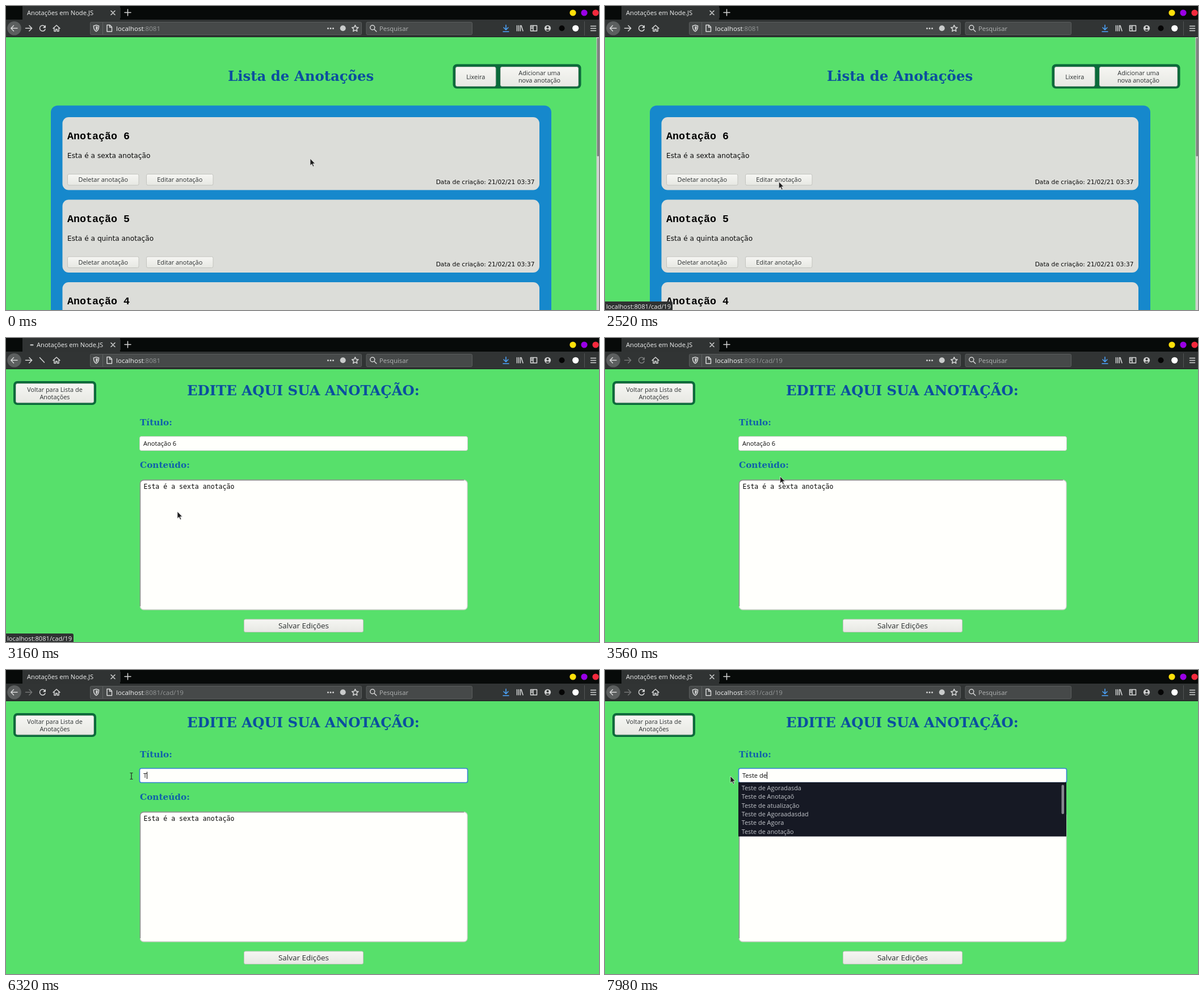
Write an HTML page that moves like this. It is 1045 px wide and 536 px high and loops after 8000 ms.

```html
<!DOCTYPE html>
<html lang="pt">
<head>
<meta charset="utf-8">
<title>Anotações</title>
<style>
html, body { margin: 0; width: 100%; height: 100%; overflow: hidden; background: #57e06b; }
svg { display: block; width: 1045px; height: 536px; }
text { white-space: pre; }
.ui { font-family: "Open Sans", "Noto Sans", sans-serif; }
.sans { font-family: "DejaVu Sans", sans-serif; }
.serif { font-family: "DejaVu Serif", serif; font-weight: bold; }
.code { font-family: "Liberation Mono", monospace; font-weight: bold; }
.mono { font-family: "DejaVu Sans Mono", monospace; }
.icon { fill: none; stroke: #d6d7d7; stroke-width: 1.5; stroke-linecap: round; stroke-linejoin: round; }
</style>
</head>
<body>
<svg id="stage" viewBox="0 0 1045 536" xmlns="http://www.w3.org/2000/svg"></svg>
<script>
const LOOP = 8000;
const stage = document.getElementById('stage');
const $ = id => document.getElementById(id);

const rect = (x, y, w, h, fill, r = 0, extra = '') =>
  `<rect x="${x}" y="${y}" width="${w}" height="${h}" rx="${r}" fill="${fill}" ${extra}/>`;
const text = (cls, size, x, y, str, fill, extra = '') =>
  `<text class="${cls}" font-size="${size}" x="${x}" y="${y}" fill="${fill}" ${extra}>${str}</text>`;
const dot = (x, y, r, fill) => `<circle cx="${x}" cy="${y}" r="${r}" fill="${fill}"/>`;
const icon = (d, extra = '') => `<path class="icon" d="${d}" ${extra}/>`;
const group = (id, body) => `<g id="${id}">${body}</g>`;

function button(x, y, w, h, lines, size = 10.95, id = '') {
  const cx = x + w / 2, gap = 13;
  const first = y + h / 2 + size * 0.37 - (lines.length - 1) * gap / 2;
  return rect(x + .5, y + .5, w - 1, h - 1, 'url(#btn)', 2.5, `stroke="#c3c4bf" ${id && `id="${id}"`}`) +
    lines.map((s, i) => text('ui', size, cx, first + i * gap, s, '#2c3031', 'text-anchor="middle"')).join('');
}

function card(y, n, word) {
  return rect(99.5, y, 840.5, 128.5, '#dcddd9', 11) +
    text('code', 18.35, 108, y + 39.3, `Anotação ${n}`, '#000') +
    text('sans', 12.2, 108, y + 72, `Esta é a ${word} anotação`, '#0a0a0a') +
    button(108, y + 100, 126.5, 20.5, ['Deletar anotação']) +
    button(247, y + 100, 118.5, 20.5, ['Editar anotação'], 10.95, 'edit' + n) +
    text('sans', 10.71, 931.5, y + 117.5, 'Data de criação: 21/02/21 03:37', '#0a0a0a', 'text-anchor="end"');
}

const chrome =
  rect(0, 0, 1045, 24, '#070a09') + rect(29, 0, 172, 24, '#303333') +
  rect(0, 24, 1045, 31, '#313434') + rect(0, 54, 1045, 1, '#1d2020') +
  rect(201, 3, 1, 18, '#2b2e2e') +
  text('ui', 11.15, 37, 15.7, 'Anotações em Node.JS', '#eff0f0', 'id="tab"') +
  `<rect id="spinner" y="11" height="2.4" rx="1.2" fill="#b9bbbb"/>` +
  icon('M185 8.5l7 7M192 8.5l-7 7') + icon('M209 11.5h11M214.500 6v11') +
  dot(999, 12, 5.6, '#ffe00a') + dot(1019, 12, 5.6, '#9a00e6') + dot(1039, 12, 5.6, '#f3293d') +
  dot(14.5, 39.3, 12.3, '#5c5f5f') +
  icon('M20 39.300H9M13.500 34.500L8.800 39.300l4.700 4.800') +
  icon('M34.500 39.300h11M41 34.500l4.700 4.800-4.700 4.800', 'id="forward"') +
  group('reload', icon('M68.500 36.300a5 5 0 1 0 .6 4.800') + '<path d="M70 33.500v5.200h-5.200z" fill="#d6d7d7"/>') +
  icon('M59.500 34.500l8 8.500', 'id="stopA"') + icon('M67.500 34.500l-8 8.500', 'id="stopB"') +
  icon('M83 39.500l6-5.500 6 5.500M85 39v5.500h2.700v-3.500h2.600v3.500H93V39') +
  rect(148.5, 28.5, 478, 22, '#464949', 2, 'stroke="#5b5e5e"') +
  rect(635, 28.5, 186.5, 22, '#464949', 2, 'stroke="#5b5e5e"') +
  icon('M159 33.700c2 1 3 1.200 4.600 1.300 0 5-1.200 8-4.600 9.800-3.400-1.800-4.600-4.800-4.600-9.800 1.600-.1 2.600-.3 4.600-1.300zM159 36.500v5.500c1.500-1 2-3 2-5z', 'stroke-width="1.2"') +
  rect(170, 29, 1, 21, '#5f6262') +
  icon('M178 33.500h5l3.500 3.500v8H178zM182.500 34v3.500h3.500', 'stroke-width="1.2"') +
  `<text class="ui" font-size="11.58" x="194" y="43.500" fill="#f3f4f4">localhost<tspan id="path" fill="#949797"></tspan></text>` +
  [567.5, 572, 576.5].map(x => dot(x, 39.5, 1.5, '#cfd0d0')).join('') +
  dot(593.7, 39.3, 5, '#c9cbcb') +
  icon('M615.300 33.700l1.700 3.700 4 .5-3 2.700.8 4-3.500-2-3.500 2 .8-4-3-2.700 4-.5z', 'stroke-width="1.2"') +
  icon('M649.800 38a4 4 0 1 1-8 0 4 4 0 1 1 8 0M648.800 41l4 4') +
  text('ui', 11.18, 658, 43.5, 'Pesquisar', '#b2b4b4') +
  icon('M881 33.500v8M877 38l4 4 4-4M876 45.300h10', 'style="stroke:#4ca5ff"') +
  icon('M900.500 34.500v9.500M903.500 34.500v9.500M906.500 34.500v9.500M908 34.500l3 9.500') +
  icon('M924.500 34.500h11v9.500h-11zM929 34.500v9.500M926 37h1.500M926 39.500h1.500', 'stroke-width="1.3"') +
  dot(954.5, 39.3, 5.6, '#cfd0d0') + dot(954.5, 37.5, 2, '#313434') +
  '<path d="M951 42.500q3.500-3 7 0-3.500 2.800-7 0z" fill="#313434"/>' +
  dot(979.5, 39.3, 5, '#050505') + dot(1003.7, 39.3, 5.6, '#fff') +
  rect(1019, 27, 1, 25, '#525555') +
  icon('M1030.500 35.500h9M1030.500 39.500h9M1030.500 43.500h9');

const listPage =
  text('serif', 24.4, 391, 132.3, 'Lista de Anotações', '#0b4e9f') +
  rect(787.5, 102.5, 226, 43, '#0b6a3b', 7) +
  button(792, 107, 71.5, 35, ['Lixeira']) +
  button(871, 107, 138, 35, ['Adicionar uma', 'nova anotação'], 10.85) +
  rect(79, 175.5, 882, 420, '#1688cc', 12) +
  card(196, 6, 'sexta') + card(341.5, 5, 'quinta') + card(487, 4, 'quarta') +
  rect(1040.5, 55, 4.5, 481, '#d0d2cf') + rect(1041.5, 56, 3.5, 209, '#7d807e', 1.5);

const editPage =
  rect(13, 76, 146, 42, '#0b6a3b', 7) +
  button(17, 80, 138, 34.5, ['Voltar para Lista de', 'Anotações'], 10.87) +
  text('serif', 24.38, 319, 101, 'EDITE AQUI SUA ANOTAÇÃO:', '#0b4e9f') +
  text('serif', 15.28, 236, 154, 'Título:', '#1060aa') +
  text('serif', 15.28, 236, 229, 'Conteúdo:', '#1060aa') +
  rect(235.5, 173.5, 578, 25, '#fffffc', 3, 'id="field" stroke="#c9cbc6"') +
  text('ui', 11.12, 242, 190, '', '#0a0a0a', 'id="value"') +
  rect(0, 179, 0, 13.5, '#3b83d6', 0, 'id="mark"') +
  text('ui', 11.12, 242, 190, 'Anotação 6', '#fff', 'id="marked" clip-path="url(#markClip)"') +
  rect(0, 179.5, 1, 12.5, '#000', 0, 'id="caret"') +
  rect(236.5, 250.5, 576.5, 228.5, '#fffffc', 6, 'stroke="#cfd1cc" stroke-width="1.3"') +
  '<path d="M236.500 473V256.500a6 6 0 0 1 6-6H807" fill="none" stroke="#858885" stroke-width="1.3"/>' +
  text('mono', 11.55, 242.5, 266, 'Esta é a sexta anotação', '#0a0a0a') +
  button(419, 495.5, 211, 23.5, ['Salvar Edições'], 13.44) +
  group('menu', rect(235, 198, 578, 95.5, '#161924') +
    [0, 1, 2, 3, 4, 5].map(i => text('ui', 10.88, 240.7, 212 + i * 15.3, '', '#c2c5ca', `id="row${i}"`)).join('') +
    rect(804.5, 202.5, 4.5, 30, '#85888f', 2, 'id="thumb"'));

stage.innerHTML = `<defs>
  <linearGradient id="btn" x2="0" y2="1"><stop stop-color="#f6f6f3"/><stop offset="1" stop-color="#e7e8e3"/></linearGradient>
  <clipPath id="markClip"><rect id="clip" y="175" height="22"/></clipPath></defs>` +
  rect(0, 0, 1045, 536, '#57e06b') + group('list', listPage) + group('edit', editPage) + chrome +
  group('status', '<path d="M0 521h116q3 0 3 3v12H0z" fill="#2f3232"/>' +
    text('ui', 11.12, 2, 533.6, 'localhost:8081/cad/19', '#f2f3f3')) +
  '<rect id="focusRing" x="249.500" y="298.500" width="113.500" height="15.500" rx="1" fill="none" stroke="#b9bbb5" stroke-dasharray="1 1"/>' +
  '<path id="arrow" d="M0 0V12.300L2.900 9.700 5 14.300 6.900 13.400 4.900 9H8.700Z" fill="#1c1c1c" stroke="#e9e9e9" stroke-width=".8"/>' +
  '<path id="beam" d="M-2.500-5.500H-.8L0-5 .8-5.500H2.500M0-5V5M-2.500 5.500H-.8L0 5 .8 5.500H2.500" fill="none" stroke="#222" stroke-width="1.2"/>';

const show = (id, on) => $(id).style.display = on ? '' : 'none';
const set = (id, attrs) => { for (const k in attrs) $(id).setAttribute(k, attrs[k]); };
const at = (steps, t) => steps.reduce((v, s) => t >= s[0] ? s[1] : v, steps[0][1]);

// Pointer path: time, x, y; positions advance in ticks.
const path = [
  [940, 536, 269], [1060, 529, 273], [1300, 470, 306], [1540, 406, 340], [1660, 378, 347], [1780, 350, 345],
  [1840, 350, 345], [2160, 328, 327], [2400, 309, 312], [2600, 302, 306],
  [3240, 302, 306], [3520, 308, 252], [3840, 313, 187],
  [4275, 313, 187], [4600, 264, 187], [4860, 221, 187]
];

function pointer(t) {
  const tick = t < 1900 ? 120 : t < 3200 ? 64 : t < 4200 ? 40 : 65;
  const base = t < 1900 ? 1060 : t < 3200 ? 1900 : t < 4200 ? 3240 : 4340;
  const q = t < 1060 ? 0 : base + Math.floor((t - base) / tick + 1e-6) * tick;
  const i = path.findIndex(p => p[0] > q);
  if (i === 0) return path[0].slice(1);
  if (i < 0) return path[path.length - 1].slice(1);
  const [a, b] = [path[i - 1], path[i]], k = (q - a[0]) / (b[0] - a[0]);
  return [a[1] + (b[1] - a[1]) * k, a[2] + (b[2] - a[2]) * k];
}

const typing = [[0, 'Anotação 6'], [6320, 'T'], [6580, 'Te'], [6820, 'Tes'], [7200, 'Test'],
  [7380, 'Teste'], [7640, 'Teste '], [7880, 'Teste d'], [7980, 'Teste de']];
const de = s => 'Teste de ' + s;
const head = [de('Agoradasda'), de('Anotaçaõ')];
const upd = de('atualização'), long = de('Agoraadasdad');
const menus = [
  [0, [...head, 'Teste', upd, 'TESTANDO', 'teste']],
  [6660, [...head, 'Teste', upd, 'teste', 'TESTANDO']],
  [7440, [...head, 'Teste', upd, 'teste', long]],
  [7940, [...head, upd, long, de('Agora'), de('anotação')]]
];
const thumbs = [[0, 30.5], [7440, 41], [7940, 51.5]];

function drawPointer(t) {
  const [x, y] = pointer(t);
  const inField = x > 235 && x < 814 && (y > 173 && y < 199 || y > 250 && y < 479);
  const beam = t >= 3240 && t < 6400 && (inField || t >= 4200);
  show('arrow', !beam);
  show('beam', beam);
  set(beam ? 'beam' : 'arrow', { transform: `translate(${x} ${y})` });
  return [x, y];
}

function drawChrome(t, y) {
  const loading = t >= 3040 && t < 3560;
  const opened = t >= 3220;
  set('tab', { x: loading ? 54 : 37 });
  show('spinner', loading);
  const swing = Math.cos((t - 3140) / 600 * 2 * Math.PI);
  const w = 4 + Math.max(0, swing * 3 - 1);
  set('spinner', { x: 45.5 - w / 2 - (1 - swing) / 2, width: w });
  show('reload', !loading);
  $('reload').style.opacity = t >= 3560 && t < 4020 ? .45 : 1;
  show('stopA', loading);
  show('stopB', loading && opened);
  $('forward').style.opacity = opened ? .4 : 1;
  $('path').textContent = opened ? ':8081/cad/19' : ':8081';
  show('status', t >= 1900 && y < 317 && t < 3280);
}

function drawField(t, x) {
  const value = at(typing, t), label = $('value');
  label.textContent = value;
  const focused = t >= 4200;
  set('field', { stroke: focused ? '#347fd2' : '#c9cbc6', 'stroke-width': focused ? 1.6 : 1 });
  const end = 242 + label.getComputedTextLength();
  const selecting = t >= 4340 && t < 6320;
  let start = end;
  if (selecting) {
    let n = value.length;
    while (n > 0 && 242 + label.getSubStringLength(0, n) > x) n--;
    start = n ? 242 + label.getSubStringLength(0, n) : 242;
  }
  const span = { x: start, width: Math.max(0, end - start) };
  set('mark', span);
  set('clip', span);
  show('mark', selecting);
  show('marked', selecting);
  set('caret', { x: Math.round(end) });
  show('caret', focused && !selecting && !(t >= 7060 && t < 7200));
}

function drawMenu(t) {
  show('menu', t >= 6360);
  at(menus, t).forEach((s, i) => $('row' + i).textContent = s);
  set('thumb', { height: at(thumbs, t) });
}

function render(t) {
  const editing = t >= 3160;
  show('list', !editing);
  show('edit', editing);
  const pressed = t >= 2740 && t < 2860;
  set('edit6', { fill: pressed ? '#d9dad5' : t >= 2860 ? '#f9f9f6' : 'url(#btn)' });
  show('focusRing', t >= 2740 && !editing);
  const [x, y] = drawPointer(t);
  drawChrome(t, y);
  drawField(t, x);
  drawMenu(t);
}

const begin = performance.now();
function frame() {
  render((performance.now() - begin) % LOOP);
  requestAnimationFrame(frame);
}
frame();
</script>
</body>
</html>
```
